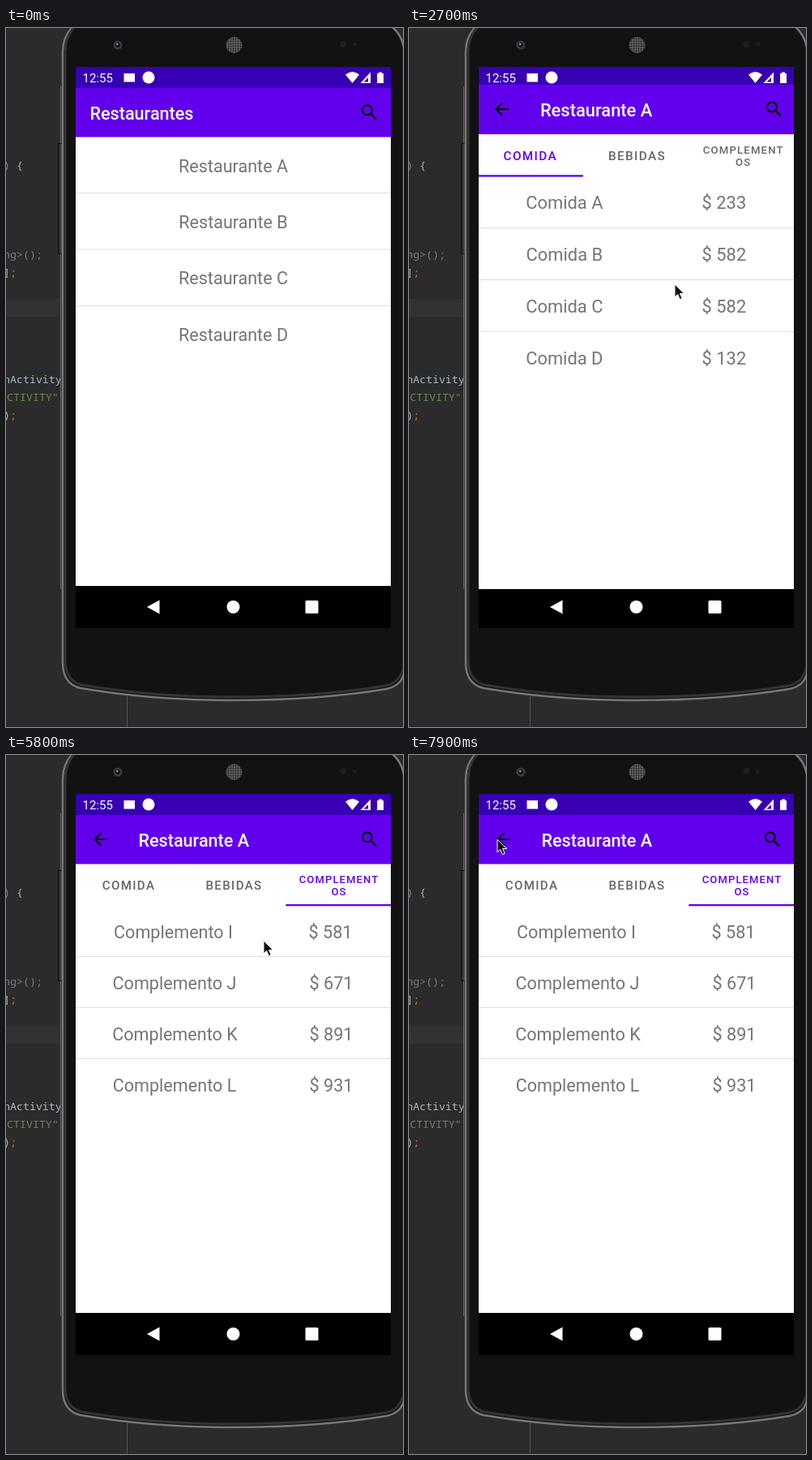
Animation of 490x862 px, one loop 8000 ms. Source, as an HTML page:

```html
<!DOCTYPE html>
<html lang="es">
<head>
<meta charset="utf-8">
<title>Restaurantes</title>
<style>
html, body { margin: 0; width: 100%; height: 100%; overflow: hidden; background: #2b2b2b; }
svg { display: block; width: 490px; height: 862px; font-family: Roboto, sans-serif; }
.code { font: 13.3px "Noto Sans Mono", "DejaVu Sans Mono", monospace; white-space: pre; }
.title { font-size: 21.6px; font-weight: 500; fill: #fff; }
.item { font-size: 21.6px; fill: #757575; text-anchor: middle; }
.tab { font-size: 15.1px; font-weight: 500; letter-spacing: 1.35px; text-anchor: middle; }
.small { font-size: 13px; letter-spacing: 1.15px; }
.bold { font-weight: 700; font-size: 16.2px; fill: #757575; text-anchor: middle; }
.body { font: 15.1px/17.68px Roboto, sans-serif; color: #757575; }
.body div { white-space: nowrap; text-align: justify; text-align-last: justify; }
</style>
</head>
<body>
<svg viewBox="0 0 490 862">
  <defs>
    <clipPath id="screenClip"><rect x="86" y="48" width="389" height="692"/></clipPath>
    <clipPath id="photoClip"><rect x="86" y="134" width="195" height="163"/></clipPath>
    <linearGradient id="button"><stop stop-color="#1a1a1a"/><stop offset="1" stop-color="#5a5a5a"/></linearGradient>
    <pattern id="mesh" width="3" height="3" patternUnits="userSpaceOnUse">
      <rect width="3" height="3" fill="#5c5c5c"/><circle cx="1.5" cy="1.5" r=".9" fill="#222"/>
    </pattern>
    <path id="search" d="M15.5 14h-.79l-.28-.27A6.47 6.47 0 0 0 16 9.5 6.5 6.5 0 1 0 9.5 16c1.61 0 3.09-.59 4.23-1.57l.27.28v.79l5 4.99L20.49 19zm-6 0a4.5 4.5 0 1 1 0-9 4.5 4.5 0 0 1 0 9z" transform="translate(435.5 91) scale(1.08)"/>
    <path id="back" d="M20 11H7.83l5.59-5.59L12 4l-8 8 8 8 1.41-1.41L7.83 13H20z" transform="translate(103.7 91) scale(1.08)"/>
    <g id="window">
      <rect x="86" y="48" width="389" height="692" fill="#fff"/>
      <rect x="86" y="48" width="389" height="26.5" fill="#3700b3"/>
      <rect x="86" y="74" width="389" height="60.5" fill="#6200ee"/>
    </g>
    <rect id="navBar" x="86" y="688" width="389" height="52" fill="#000"/>
  </defs>

  <rect width="490" height="862" fill="#2b2b2b"/>
  <rect y="334" width="68" height="22" fill="#323232"/>
  <g class="code" fill="#a9b7c6">
    <text x="-3" y="174"><tspan fill="#808080">)</tspan> {</text>
    <text x="-3" y="284" fill="#7c7c7c">ng&gt;();</text>
    <text x="-3" y="306">]<tspan fill="#cc7832">;</tspan></text>
    <text x="-3" y="438">nActivity</text>
    <text x="1" y="460" fill="#6a8759">CTIVITY"</text>
    <text x="-3" y="482">)<tspan fill="#cc7832">;</tspan></text>
  </g>
  <path d="M149.5 824V862" stroke="#555"/>

  <path d="M67.5 72V692" stroke="#686868"/>
  <rect x="64.5" y="142.5" width="5" height="136" fill="url(#button)" stroke="#111"/>
  <path d="M83 -2Q70 10 70 30V782Q70 809 92 814Q180 829 280 829Q385 829 470 815Q488 811 491 796V24Q488 8 476 -2Z" fill="#121212" stroke="#777" stroke-width="2.5"/>
  <path d="M85 -2Q73 11 73 30V780Q73 804 93 810Q180 825 280 825Q385 825 469 811Q486 807 490 790" fill="none" stroke="#333" stroke-width="3"/>
  <circle cx="138" cy="21" r="5.5" fill="#3b3b40"/><circle cx="138" cy="21" r="3" fill="#14141f"/><circle cx="137.3" cy="20" r="1.2" fill="#99a"/>
  <circle cx="281.5" cy="21" r="10" fill="url(#mesh)"/>
  <circle cx="416.5" cy="20" r="4" fill="#1e1e1e"/><circle cx="430.5" cy="20" r="2.5" fill="#1e1e1e"/>

  <g clip-path="url(#screenClip)">
    <rect x="86" y="48" width="389" height="692"/>
    <g id="home">
      <use href="#window"/>
      <text class="title" x="103.5" y="112.5">Restaurantes</text>
      <use href="#search"/>
      <g id="homeRows"></g>
      <use href="#navBar"/>
    </g>
    <g id="menu">
      <use href="#window"/>
      <text class="title" x="163.5" y="112.5">Restaurante A</text>
      <use href="#back"/><use href="#search"/>
      <g id="pager"></g>
      <g id="tabs">
        <text class="tab" x="151.5" y="166">COMIDA</text>
        <text class="tab" x="281.5" y="166">BEBIDAS</text>
        <text class="tab small"><tspan x="411" y="158">COMPLEMENT</tspan><tspan x="411" y="173">OS</tspan></text>
      </g>
      <rect id="indicator" x="86" y="184" width="129.7" height="2.3" fill="#6200ee"/>
      <use href="#navBar"/>
    </g>
    <g id="detail">
      <use href="#window"/>
      <text class="title" id="detailTitle" x="163.5" y="112.5"></text>
      <use href="#back"/>
      <g clip-path="url(#photoClip)">
        <rect x="86" y="134" width="195" height="163" fill="#b9b9b5"/>
        <path d="M86 134H150L112 200L86 205Z" fill="#d8dcde"/>
        <path d="M146 134H281V186Q250 172 225 166Q170 166 152 148Z" fill="#17500f"/>
        <path d="M166 134Q188 160 214 141L230 166Q254 140 281 160V134Z" fill="#2f7d1e"/>
        <ellipse cx="178" cy="256" rx="112" ry="43" fill="#e6e4e2"/>
        <path d="M104 193L150 165L246 184L254 236L220 240L150 256L104 234Z" fill="#eadbc8"/>
        <path d="M103 208L163 224L161 243L104 224Z" fill="#a66a2c"/>
        <path d="M104 228L161 242L158 256L106 240Z" fill="#4c2813"/>
        <path d="M104 193L150 165Q205 164 247 185L240 204Q195 212 160 203Z" fill="#89552f"/>
        <path d="M155 182Q164 169 174 178Q176 163 187 170Q186 179 196 184Q176 193 155 182Z" fill="#55a526"/>
        <path d="M158 270Q164 236 190 229Q225 233 231 262Q195 287 158 270Z" fill="#dcc5aa"/>
        <path d="M166 262Q188 242 222 256Q205 277 166 262Z" fill="#a7723f"/>
        <path d="M205 256Q234 258 245 246L281 240M222 248L247 245M220 268Q242 265 248 247" fill="none" stroke="#8c8780" stroke-width="3"/>
      </g>
      <text class="bold" id="detailPrice" x="377.5" y="181"></text>
      <text class="bold" id="detailName" x="377.5" y="262.5"></text>
      <text class="bold" x="86" y="331" style="font-size:21.6px;text-anchor:start">Descripción</text>
      <foreignObject x="86" y="350" width="389" height="338"><div class="body" id="lorem"></div></foreignObject>
      <use href="#navBar"/>
    </g>

    <g fill="#fff">
      <text x="94.5" y="67" font-size="15">12:55</text>
      <rect x="145.5" y="56" width="13.5" height="10.5"/>
      <circle cx="176" cy="61" r="7.5"/>
      <path d="M419 57.5Q427.5 50.5 436 57.5L427.5 68Z"/>
      <path d="M450 54.5V68H437.500Z"/><path d="M447 61V66.500H441.500Z" fill="#3700b3"/>
      <path d="M458 56H460V54.500H464V56H466V68H458Z"/>
      <path d="M174 714L189.500 705.500V722.500Z"/>
      <circle cx="280.500" cy="714" r="8"/>
      <rect x="369.500" y="706" width="16" height="16" rx="1.500"/>
    </g>
  </g>
  <path id="cursor" d="M0 0V16L3.700 12.600L6.400 18.800L9.200 17.500L6.500 11.500H11.600Z" fill="#111" stroke="#fff" stroke-width="1"/>
</svg>
<script>
const LOOP = 8000, SLIDE = 250, SWITCH = 400, WIDTH = 389;
const $ = id => document.getElementById(id);
const clamp = v => Math.max(0, Math.min(1, v));
const smooth = v => { v = clamp(v); return v * v * (3 - 2 * v); };
const easeOut = v => 1 - (1 - clamp(v)) ** 3;

const sections = [
  { name: "Comida", first: "A", prices: [233, 582, 582, 132], x: [193, 193, 193, 193], px: 387.5 },
  { name: "Bebida", first: "E", prices: [816, 318, 592, 285], x: [190.3, 190.6, 191.2, 191.7], px: 385.5 },
  { name: "Complemento", first: "I", prices: [581, 671, 891, 931], x: [206.5, 208, 208.5, 208], px: 401.5 }
];
const itemName = (s, i) => s.name + " " + String.fromCharCode(s.first.charCodeAt(0) + i);

// Screen changes; pick = [section, row] for the detail page.
const switches = [
  { at: 800, from: "home", to: "menu", open: true },
  { at: 1900, from: "menu", to: "detail", open: true, pick: [0, 0] },
  { at: 2505, from: "detail", to: "menu", pick: [0, 0] },
  { at: 2830, from: "menu", to: "detail", open: true, pick: [0, 2] },
  { at: 3300, from: "detail", to: "menu", pick: [0, 2] },
  { at: 4150, from: "menu", to: "detail", open: true, pick: [1, 0] },
  { at: 4750, from: "detail", to: "menu", pick: [1, 0] },
  { at: 6200, from: "menu", to: "detail", open: true, pick: [2, 0] },
  { at: 7350, from: "detail", to: "menu", pick: [2, 0] }
];
const tabClicks = [3670, 5350];
const cursorPath = [
  [100, -14, 300], [600, 194, 172], [1300, 194, 172], [1600, 194, 217], [1950, 194, 217],
  [2350, 112, 106], [2500, 112, 106], [2700, 328, 316], [2860, 328, 330], [3150, 112, 106],
  [3330, 112, 106], [3620, 280, 162], [3700, 280, 162], [3960, 192, 227], [4200, 192, 227],
  [4600, 112, 106], [4800, 112, 106], [5250, 405, 162], [5400, 405, 162], [5780, 318, 229],
  [6300, 318, 229], [7100, 117, 125], [7300, 109, 104], [8000, 109, 104]
];

const item = (x, y, text) => `<text class="item" x="${x}" y="${y}">${text}</text>`;
const rule = y => `<path d="M86 ${y}H475" stroke="#dedede"/>`;

$("homeRows").innerHTML = [..."ABCD"].map((c, i) =>
  item(280.5, 177.5 + 69.4 * i, "Restaurante " + c) + (i < 3 ? rule(203.5 + 69.5 * i) : "")).join("");

$("pager").innerHTML = sections.map((s, n) => `<g transform="translate(${n * WIDTH})">` +
  s.prices.map((price, i) => item(s.x[i], 225.7 + 63 * i, itemName(s, i)) +
    item(s.px - (n === 2 && i === 0 ? 1 : 0), 225.7 + 63 * i, "$ " + price) +
    (i < 3 ? rule(248.5 + 63 * i) : "")).join("") + "</g>").join("");

$("lorem").innerHTML = `Lorem ipsum dolor sit amet, consectetur adipiscing
elit. Nunc tempor porta ex, vel ullamcorper orci dapibus
id. Donec sit amet bibendum mauris, eu sodales felis.
Morbi eget varius sapien. Nam ultricies consequat enim
sed pulvinar. Nunc sit amet consequat turpis, ut auctor
quam. Suspendisse tristique varius metus quis cursus.
Ut felis tortor, aliquet a velit ut, imperdiet vulputate erat.
Ut porttitor est sed lacinia commodo.&nbsp; Donec eu lorem
vitae augue viverra volutpat. In hac habitasse platea
dictumst. Proin porta euismod magna nec vestibulum.
Nullam ut ante eu risus sagittis sagittis id et mauris.
Vivamus pharetra, nisl et consequat porttitor, tellus erat
rutrum augue, in volutpat eros erat eu massa. Sed laoreet
viverra risus, vel consequat augue varius sit amet. Proin
felis mi, hendrerit quis venenatis viverra, tincidunt at erat.
Maecenas in magna sed ligula efficitur viverra bibendum a
mi.&nbsp; Vestibulum vitae magna vel purus feugiat elementum
sed eu arcu. Donec non tortor posuere, euismod nibh
eu, vestibulum eros. Vivamus interdum luctus mauris, ut`
  .split("\n").map(line => `<div>${line}</div>`).join("");

function showScreen(id, scale, alpha) {
  const el = $(id);
  el.style.display = alpha > 0 ? "" : "none";
  el.setAttribute("opacity", alpha);
  el.setAttribute("transform", scale === 1 ? "" : `translate(280.5 394) scale(${scale}) translate(-280.5 -394)`);
}

function drawScreens(t) {
  const state = { home: [1, 0], menu: [1, 0], detail: [1, 0] };
  const sw = switches.filter(s => s.at <= t).pop();
  if (!sw) state.home = [1, 1];
  else {
    const dt = t - sw.at, e = easeOut(dt / SWITCH), fade = clamp((dt - 35) / 50);
    const moving = dt < SWITCH;
    if (sw.open) {
      state[sw.from] = [1 + 0.15 * e, moving ? 1 : 0];
      state[sw.to] = [0.85 + 0.15 * e, fade];
    } else {
      state[sw.from] = [1 - 0.1 * e, 1 - fade];
      state[sw.to] = [1.1 - 0.1 * e, 1];
    }
    if (sw.pick) {
      const s = sections[sw.pick[0]], name = itemName(s, sw.pick[1]);
      $("detailTitle").textContent = $("detailName").textContent = name;
      $("detailPrice").textContent = "$ " + s.prices[sw.pick[1]];
    }
  }
  for (const id in state) showScreen(id, ...state[id]);
}

function drawTabs(t) {
  const pos = tabClicks.reduce((sum, at) => sum + smooth((t - at) / SLIDE), 0);
  const active = tabClicks.filter(at => t >= at).length;
  $("pager").setAttribute("transform", `translate(${-pos * WIDTH})`);
  $("indicator").setAttribute("x", 86 + pos * WIDTH / 3);
  [...$("tabs").children].forEach((tab, i) => tab.setAttribute("fill", i === active ? "#6200ee" : "#666"));
}

function drawCursor(t) {
  const next = cursorPath.findIndex(p => p[0] > t);
  const b = cursorPath[next], a = cursorPath[next - 1] || b;
  const k = a === b ? 0 : smooth((t - a[0]) / (b[0] - a[0]));
  const at = i => a[i] + (b[i] - a[i]) * k;
  $("cursor").setAttribute("transform", `translate(${at(1)} ${at(2)})`);
}

function draw(t) {
  drawScreens(t);
  drawTabs(t);
  drawCursor(t);
}

const start = performance.now();
function tick() {
  draw((performance.now() - start) % LOOP);
  requestAnimationFrame(tick);
}
tick();
</script>
</body>
</html>
```
